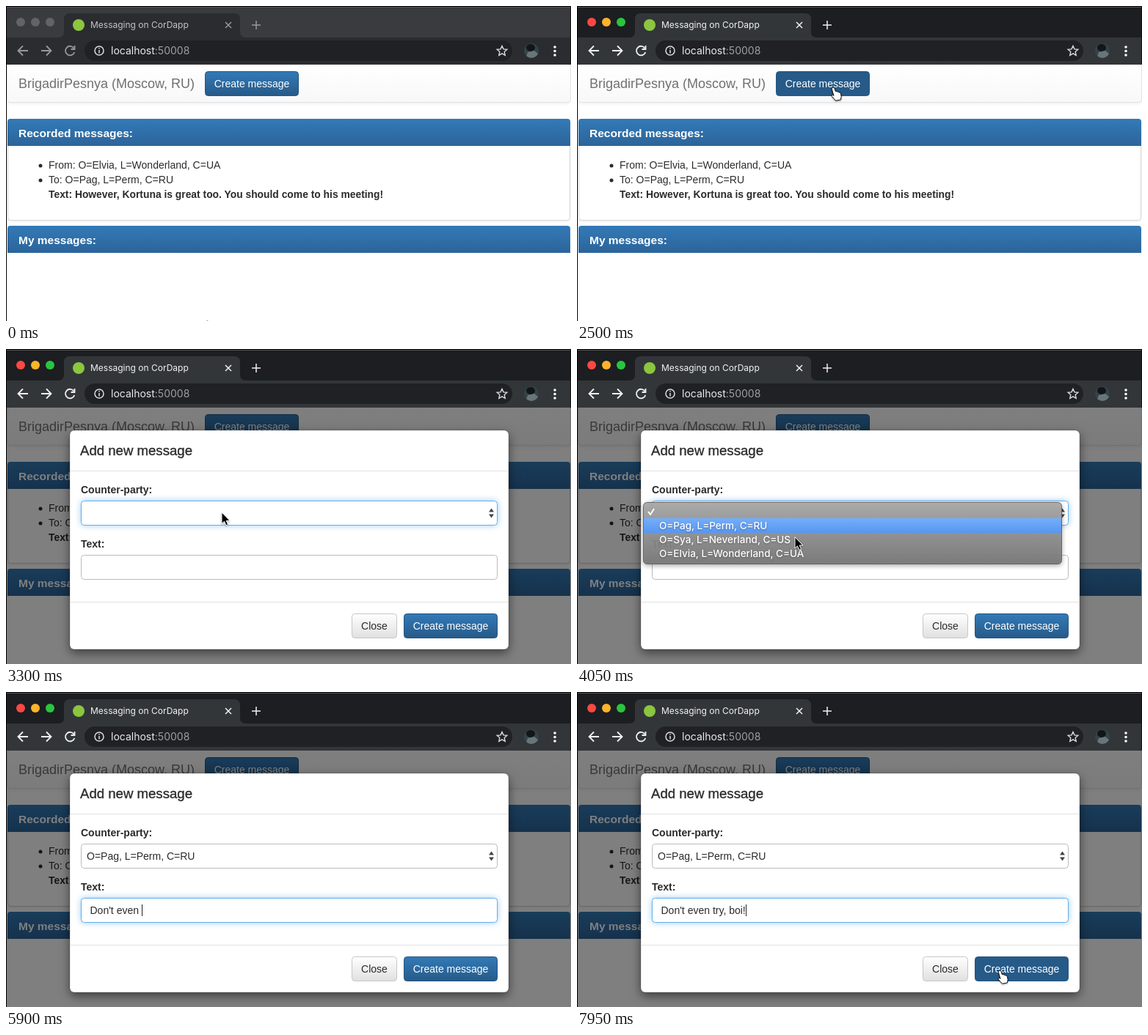
Recreate the animation shown at these times as an HTML page. Size 770 by 430 pixels, loop 8 s.

```html
<!DOCTYPE html>
<html lang="en">
<head>
<meta charset="utf-8">
<title>Messaging form</title>
<style>
  html, body { margin: 0; width: 100%; height: 100%; overflow: hidden; background: #fff; }
  svg { display: block; }
  text { font: 14px "Liberation Sans", Arial, sans-serif; fill: #2b2b2b; white-space: pre; }
  .bold { font-weight: 700; }
  .white { fill: #fff; }
  .mid { text-anchor: middle; }
  .ui { font-family: Inter, Roboto, sans-serif; }
  .heading { font-size: 15.5px; font-weight: 700; fill: #fff; }
  .field { fill: #fff; stroke: #bbb; }
  .focus { stroke: #66afe9; filter: drop-shadow(0 0 4px rgba(102, 175, 233, .65)); }
  .primary { fill: url(#primary); stroke: #245580; }
  .hover { fill: #265a88; }
  .icon { fill: none; stroke-width: 1.8; stroke: #97989b; }
  .tab { fill: #2b2c2f; }
  .strip { fill: #3a3b3f; }
  .tabText { font-size: 12px; fill: #c3c4c6; }
  .light { fill: #626366; }
  .active .icon { stroke: #f1f1f2; }
  .active .tab { fill: #323639; }
  .active .strip { fill: #1c1e21; }
  .active .tabText { fill: #f1f1f2; }
  .active .red { fill: #fc4842; }
  .active .amber { fill: #fdb32b; }
  .active .green { fill: #2ac53f; }
</style>
</head>
<body>
<svg width="770" height="430" viewBox="0 0 770 430">
  <defs>
    <linearGradient id="primary" x2="0" y2="1"><stop stop-color="#337ab7"/><stop offset="1" stop-color="#265a88"/></linearGradient>
    <linearGradient id="panel" x2="0" y2="1"><stop stop-color="#337ab7"/><stop offset="1" stop-color="#2c649a"/></linearGradient>
    <linearGradient id="plain" x2="0" y2="1"><stop stop-color="#fff"/><stop offset="1" stop-color="#e0e0e0"/></linearGradient>
    <linearGradient id="nav" x2="0" y2="1"><stop stop-color="#fff"/><stop offset="1" stop-color="#f8f8f8"/></linearGradient>
    <linearGradient id="menuFill" x2="0" y2="1"><stop stop-color="#a9a9a9"/><stop offset="1" stop-color="#777"/></linearGradient>
    <linearGradient id="choice" x2="0" y2="1"><stop stop-color="#74aefa"/><stop offset="1" stop-color="#5797f2"/></linearGradient>
    <clipPath id="face"><circle cx="716" cy="61" r="10"/></clipPath>
  </defs>

  <g id="page">
    <rect width="770" height="430" fill="#fff"/>
    <rect x="1.5" y="79.5" width="768" height="52" rx="4" fill="url(#nav)" stroke="#e2e2e2" style="filter:drop-shadow(0 1px 2px rgba(0,0,0,.08))"/>
    <text x="17" y="112" style="font-size:18px;fill:#707070">BrigadirPesnya (Moscow, RU)</text>
    <rect id="openButton" class="primary" x="271.5" y="89.5" width="127" height="33" rx="4"/>
    <text class="white mid" x="335" y="111">Create message</text>

    <rect x="2.5" y="154.5" width="766" height="138" rx="4" fill="#fff" stroke="#d6d6d6" style="filter:drop-shadow(0 1px 1px rgba(0,0,0,.08))"/>
    <path d="M2 191V158q0-4 4-4H765q4 0 4 4V191z" fill="url(#panel)"/>
    <text class="heading" x="17" y="179">Recorded messages:</text>
    <circle cx="47" cy="218" r="2.5" fill="#2b2b2b"/>
    <circle cx="47" cy="238" r="2.5" fill="#2b2b2b"/>
    <text x="58" y="222">From: O=Elvia, L=Wonderland, C=UA</text>
    <text x="58" y="242">To: O=Pag, L=Perm, C=RU</text>
    <text class="bold" x="58" y="262" style="font-size:13.85px">Text: However, Kortuna is great too. You should come to his meeting!</text>

    <path d="M2 337V304q0-4 4-4H765q4 0 4 4V337z" fill="url(#panel)"/>
    <text class="heading" x="17" y="325">My messages:</text>
  </g>

  <rect id="backdrop" y="80" width="770" height="350"/>

  <g id="modal">
    <rect x="87" y="111" width="598" height="299" rx="6" fill="#fff" stroke="#000" stroke-opacity=".2" style="filter:drop-shadow(0 5px 7px rgba(0,0,0,.5))"/>
    <path d="M87 166.5H685M87 345.5H685" stroke="#e2e2e2"/>
    <text x="101" y="145" style="font-size:18.6px;stroke:#2b2b2b;stroke-width:.35">Add new message</text>
    <text class="bold" x="102" y="197">Counter-party:</text>
    <rect id="select" class="field" x="102.5" y="207.5" width="567" height="33" rx="4"/>
    <text id="selected" x="110" y="229">O=Pag, L=Perm, C=RU</text>
    <path d="M658 222.500l3.500-5 3.500 5zM658 225.500l3.500 5 3.500-5z" fill="#444"/>
    <text class="bold" x="102" y="271">Text:</text>
    <rect id="input" class="field" x="102.5" y="281.500" width="567" height="33" rx="4"/>
    <text id="typed" x="114.500" y="303" xml:space="preserve"></text>
    <path id="caret" d="M.5 290V306" stroke="#222"/>
    <rect x="471.5" y="361.5" width="61" height="33" rx="4" fill="url(#plain)" stroke="#c6c6c6"/>
    <text class="mid" x="502" y="383">Close</text>
    <rect id="sendButton" class="primary" x="542.5" y="361.5" width="127" height="33" rx="4"/>
    <text class="white mid" x="606" y="383">Create message</text>
  </g>

  <g id="menu">
    <rect x="90.5" y="209.5" width="570" height="84" rx="5" fill="url(#menuFill)" fill-opacity=".93" stroke="#666" style="filter:drop-shadow(0 2px 3px rgba(0,0,0,.35))"/>
    <rect id="highlight" x="91" y="231" width="569" height="20" fill="url(#choice)"/>
    <path d="M97 222l3 4 5-8" fill="none" stroke="#fff" stroke-width="2"/>
    <g style="filter:drop-shadow(0 1px 1px rgba(0,0,0,.3))">
      <text class="ui white" x="112" y="246" style="font-size:13.500px;font-weight:500">O=Pag, L=Perm, C=RU</text>
      <text class="ui white" x="112" y="265" style="font-size:13.500px;font-weight:500">O=Sya, L=Neverland, C=US</text>
      <text class="ui white" x="112" y="284" style="font-size:13.500px;font-weight:500">O=Elvia, L=Wonderland, C=UA</text>
    </g>
  </g>

  <g id="browser">
    <rect class="strip" width="770" height="44"/>
    <path class="tab" d="M0 80V43H71q8 0 8-8V18q0-8 8-8H311q8 0 8 8V35q0 8 8 8H770V80z"/>
    <path d="M0 .5H770" stroke="#000"/>
    <path d="M1 1.500H769" stroke="#58595c"/>
    <circle class="light red" cx="20" cy="22" r="6"/>
    <circle class="light amber" cx="40" cy="22" r="6"/>
    <circle class="light green" cx="60" cy="22" r="6"/>
    <circle cx="99" cy="26" r="8" fill="#8cc63f"/>
    <text class="ui tabText" x="115" y="30">Messaging on CorDapp</text>
    <path class="icon" style="stroke-width:1.5" d="M299 22l8 8m0-8l-8 8M335 26h12m-6-6v12"/>
    <rect x="107" y="47" width="583" height="28" rx="14" fill="#202124"/>
    <path class="icon" d="M30 61H17m6-6.500l-6.500 6.500 6.500 6.500M48 61H61m-6-6.500l6.500 6.500-6.500 6.500M92.500 57.500a6.300 6.300 0 1 0 .8 5.500M93.500 54v5h-5"/>
    <g fill="none" stroke="#dcdddf" stroke-width="1.500">
      <circle cx="127" cy="61" r="6"/>
      <path d="M127 60v4.500M127 57v1.500"/>
      <path d="M676 54.500l2 4.400 4.800.5-3.600 3.200 1 4.700-4.200-2.400-4.200 2.400 1-4.700-3.600-3.200 4.800-.5z" stroke-width="1.400"/>
    </g>
    <text class="ui" x="143" y="66" style="fill:#e8eaed">localhost<tspan fill="#9aa0a6">:50008</tspan></text>
    <g clip-path="url(#face)">
      <rect x="706" y="51" width="20" height="20" fill="#34434a"/>
      <ellipse cx="715" cy="57" rx="6" ry="5" fill="#111619"/>
      <path d="M708 72l3-9 9-2 6 5v6z" fill="#68767a"/>
    </g>
    <g fill="#fff"><circle cx="748" cy="56" r="1.800"/><circle cx="748" cy="61.500" r="1.800"/><circle cx="748" cy="67" r="1.800"/></g>
  </g>
  <path d="M.5 0V430" stroke="#000"/>
  <path d="M769.500 0V80" stroke="#111"/>

  <g id="pointer" style="filter:drop-shadow(0 1px 1px rgba(0,0,0,.35))">
    <path id="arrow" d="M0 0V15.500l3.500-3.200 2.400 5.500 2.700-1.200-2.400-5.200H11z" fill="#000" stroke="#fff"/>
    <path id="hand" d="M1.500 1.200q1.700-.8 2.400 1l1.500 4.500q1.500-.9 2.300.5 1.700-.8 2.400.8 1.900-.4 2.300 1.500l.8 4-.8 4.500-7 1.200-4.900-5.700q-1.300-2 .9-2.300l1.600 1.300-2.600-8.700q-.3-1.900 1.100-2.600z" fill="#fff" stroke="#111"/>
    <path id="beam" d="M-3-8q3 0 3 2V6q0 2-3 2M3-8q-3 0-3 2V6q0 2 3 2" fill="none" stroke="#222"/>
  </g>
</svg>
<script>
const DURATION = 8000;
const MESSAGE = "Don't even try, boi!";
const KEY_TIMES = [4980, 5150, 5200, 5300, 5350, 5400, 5450, 5500, 5550, 5700,
  5800, 6150, 6200, 6250, 6450, 6600, 6750, 6950, 7150, 7300];
// Pointer stops: time, x, y
const STOPS = [
  [30, 274, 428], [850, 57, 142], [1200, 126, 129], [1550, 126, 129],
  [2150, 347, 110], [2950, 347, 110], [3270, 294, 223], [3600, 294, 223],
  [4080, 297, 257], [4250, 290, 242], [4400, 290, 242], [4750, 268, 298],
  [7450, 268, 298], [7900, 574, 379]
];
const parts = Object.fromEntries([...document.querySelectorAll("[id]")].map(e => [e.id, e]));
const clamp = v => Math.max(0, Math.min(1, v));
const progress = (t, from, to) => clamp((t - from) / (to - from));
const show = (part, on) => { part.style.display = on ? "" : "none"; };

function pointerAt(t) {
  const next = STOPS.findIndex(stop => stop[0] > t);
  if (next === 0) return STOPS[0].slice(1);
  if (next < 0) return STOPS.at(-1).slice(1);
  const [t0, x0, y0] = STOPS[next - 1], [t1, x1, y1] = STOPS[next];
  const p = progress(t, t0, t1), eased = p * p * (3 - 2 * p);
  return [x0 + (x1 - x0) * eased, y0 + (y1 - y0) * eased];
}

function drawForm(t) {
  const slide = 1 - (1 - progress(t, 2865, 3165)) ** 1.65;
  parts.backdrop.style.opacity = .5 * progress(t, 2715, 2865);
  parts.modal.style.opacity = progress(t, 2865, 3015);
  parts.modal.setAttribute("transform", `translate(0 ${-75 * (1 - slide)})`);
  show(parts.modal, t > 2865);

  parts.select.classList.toggle("focus", t >= 3270 && t < 4850);
  parts.input.classList.toggle("focus", t >= 4850);
  show(parts.selected, t >= 4350);
  show(parts.menu, t >= 3400 && t < 4520);
  parts.menu.style.opacity = 1 - progress(t, 4370, 4520);
  show(parts.highlight, t >= 3750);

  parts.typed.textContent = MESSAGE.slice(0, KEY_TIMES.filter(k => k <= t).length);
  const caretX = 115 + parts.typed.getComputedTextLength();
  parts.caret.setAttribute("transform", `translate(${Math.round(caretX)} 0)`);
  show(parts.caret, t >= 4850);
}

function drawPointer(t) {
  const [x, y] = pointerAt(t);
  const onOpen = t > 2250 && t < 2730;
  const onSend = t > 7450 && x > 542 && y > 361;
  const onInput = t > 4520 && y > 281 && y < 315;
  parts.openButton.classList.toggle("hover", onOpen);
  parts.sendButton.classList.toggle("hover", onSend);
  show(parts.hand, onOpen || onSend);
  show(parts.beam, onInput);
  show(parts.arrow, !(onOpen || onSend || onInput));
  show(parts.pointer, t < 4950 || t >= 7450);
  parts.pointer.setAttribute("transform", `translate(${x} ${y})`);
}

function draw(now) {
  const t = now % DURATION;
  parts.browser.classList.toggle("active", t >= 2250);
  drawForm(t);
  drawPointer(t);
  requestAnimationFrame(draw);
}
requestAnimationFrame(draw);
</script>
</body>
</html>
```
